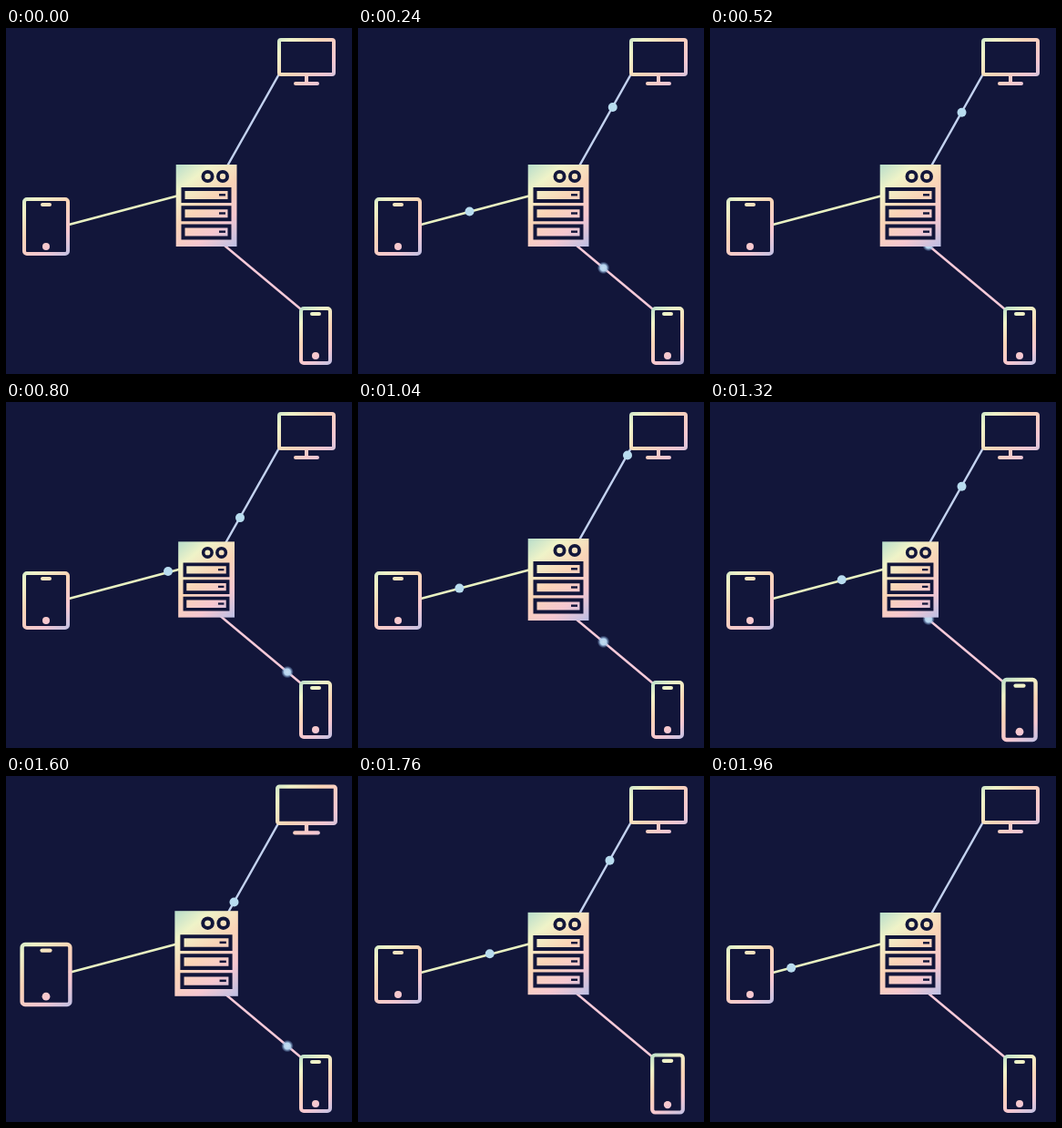
An HTML page with a canvas for the animation above (2000 ms loop, 380x380 px).

```html
<!DOCTYPE html>
<html lang="en">
<head>
<meta charset="utf-8">
<title>Network</title>
<style>
html, body { margin: 0; width: 100%; height: 100%; overflow: hidden; background: #12163a; }
canvas { display: block; }
</style>
</head>
<body>
<canvas id="stage" width="380" height="380"></canvas>
<script>
const ctx = document.getElementById('stage').getContext('2d');
const BG = '#12163a', DOT = '#b8dcef';
const TICK = 40, TICKS = 50;

// Each dot leaves at its start tick and moves one step per tick.
const links = [
  { from: [232, 171], to: [300, 50.5], color: '#c3d2f0',
    first: [244, 150], step: [6.5, -11.44], last: 8.5, starts: [0.5, 8, 18, 28, 39] },
  { from: [200, 181.3], to: [69, 216], color: '#e9f2c2',
    first: [178, 186], step: [-11.1, 3.1], last: 8, starts: [1, 20, 30, 41] },
  { from: [230, 230.5], to: [324, 309], color: '#f6cad9',
    first: [240, 238.5], step: [9.86, 8.3], last: 8, starts: [3, 13, 23, 33], soft: true }
];

const devices = [
  { center: [330, 37], peaks: [18, 28, 39.15], draw: monitor, paint: fade(292, 4, 364, 68) },
  { center: [44, 218], peaks: [30, 40], draw: tablet, paint: fade(10, 178, 72, 252) },
  { center: [340, 338], peaks: [23, 33, 43], draw: phone, paint: fade(320, 306, 361, 371) }
];

const beat = [[0, 1], [13, 1], [20, 0.925], [26, 1], [33, 0.925], [40, 1.04], [45, 1], [50, 1]];
const serverPaint = fade(184, 150, 256, 240);

function fade(x0, y0, x1, y1) {
  const g = ctx.createLinearGradient(x0, y0, x1, y1);
  ['#b4dccb', '#eff3c8', '#fad4b7', '#f6c7d0', '#b9bfe6'].forEach((c, i) =>
    g.addColorStop([0, 0.22, 0.48, 0.74, 1][i], c));
  return g;
}

function disc(x, y, r, fill) {
  ctx.fillStyle = fill;
  ctx.beginPath();
  ctx.arc(x, y, r, 0, Math.PI * 2);
  ctx.fill();
}

function line(x0, y0, x1, y1, width, color, cap = 'butt') {
  ctx.strokeStyle = color;
  ctx.lineWidth = width;
  ctx.lineCap = cap;
  ctx.beginPath();
  ctx.moveTo(x0, y0);
  ctx.lineTo(x1, y1);
  ctx.stroke();
}

function frame(x, y, w, h, r, color) {
  ctx.strokeStyle = color;
  ctx.lineWidth = 4;
  ctx.beginPath();
  ctx.roundRect(x, y, w, h, r);
  ctx.stroke();
}

function monitor(paint) {
  frame(300, 13, 60, 38, 2, paint);
  line(330, 52, 330, 60, 4, paint);
  line(318, 61, 342, 61, 4, paint, 'round');
}

function handheld(x, y, w, paint) {
  const mid = x + w / 2;
  frame(x, y, w, 60, 3, paint);
  line(mid - 4, y + 6, mid + 4, y + 6, 4, paint, 'round');
  disc(mid, y + 52, 4, paint);
}

function tablet(paint) { handheld(20, 188, 48, paint); }
function phone(paint) { handheld(324, 308, 32, paint); }

function server() {
  ctx.fillStyle = serverPaint;
  ctx.fillRect(186.7, 150, 66.8, 90);
  for (const x of [221.5, 238]) {
    disc(x, 163, 7, BG);
    disc(x, 163, 3.2, serverPaint);
  }
  for (let i = 0; i < 3; i++) {
    const y = 177 + i * 20.2;
    frame(194.5, y, 51, 13, 0, BG);
    line(234, y + 6.3, 241, y + 6.3, 2.4, BG);
  }
}

function scaled([x, y], k, draw) {
  ctx.save();
  ctx.translate(x, y);
  ctx.scale(k, k);
  ctx.translate(-x, -y);
  draw();
  ctx.restore();
}

function pulse(n, peaks) {
  const d = Math.min(...peaks.map(p => Math.abs(n - p)));
  return d < 2 ? 1 + 0.05 * (1 + Math.cos(Math.PI * d / 2)) : 1;
}

function ease(n, keys) {
  const i = keys.findIndex(k => k[0] > n);
  const [a, va] = keys[i - 1], [b, vb] = keys[i];
  return va + (vb - va) * (1 - Math.cos(Math.PI * (n - a) / (b - a))) / 2;
}

function dot(x, y, soft) {
  if (!soft) return disc(x, y, 5, DOT);
  const g = ctx.createRadialGradient(x, y, 0, x, y, 6.8);
  g.addColorStop(0, '#c6dcf0');
  g.addColorStop(0.5, '#b4d4ee');
  g.addColorStop(1, 'rgba(120,160,215,0)');
  disc(x, y, 6.8, g);
}

function dots(n, link) {
  for (const start of link.starts) {
    const age = n - start;
    if (age < 0 || age >= link.last + 1) continue;
    const s = Math.min(age, link.last);
    dot(link.first[0] + link.step[0] * s, link.first[1] + link.step[1] * s, link.soft);
  }
}

function render(now) {
  const n = Math.floor((now + 0.5) / TICK) % TICKS;
  ctx.fillStyle = BG;
  ctx.fillRect(0, 0, 380, 380);
  for (const l of links) {
    line(...l.from, ...l.to, 2.5, l.color);
    dots(n, l);
  }
  for (const d of devices) scaled(d.center, pulse(n, d.peaks), () => d.draw(d.paint));
  scaled([220, 195], ease(n, beat), server);
  requestAnimationFrame(render);
}

render(0);
</script>
</body>
</html>
```
